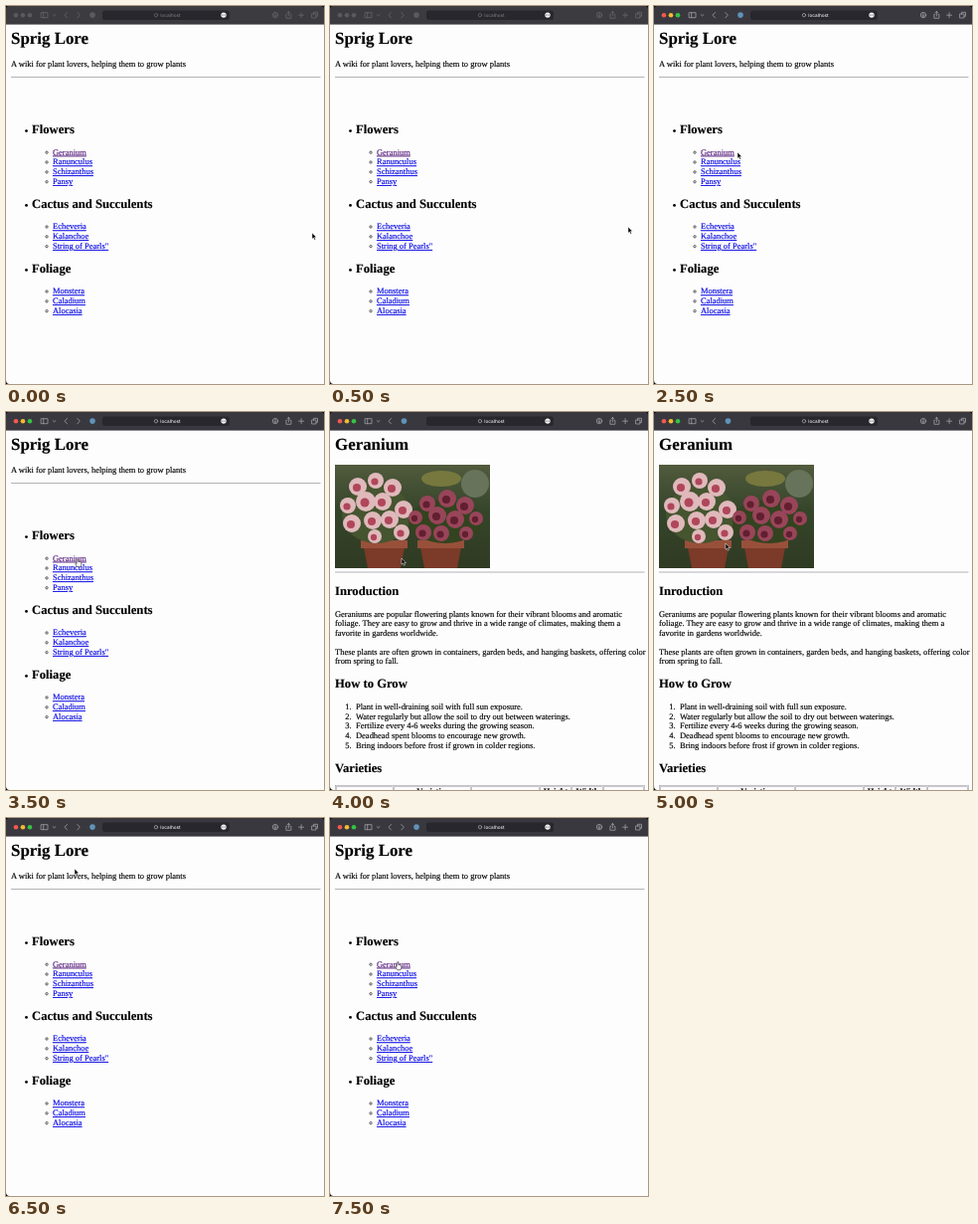
These frames come from a looping animation (320x380 px, 8000 ms). An HTML page:

```html
<!DOCTYPE html>
<html lang="en">
<head>
<meta charset="utf-8">
<title>Sprig Lore</title>
<style>
  html, body { margin: 0; width: 100%; height: 100%; overflow: hidden; background: #fdfdfd; }
  svg { display: block; width: 320px; height: 380px; }
  text {
    font: 8.47px "Liberation Serif", "Times New Roman", serif; white-space: pre; text-rendering: geometricPrecision;
    fill: currentColor; stroke: currentColor; stroke-width: .14;
  }
  .h1 { font-size: 16.9px; font-weight: bold; }
  .h2 { font-size: 12.65px; font-weight: bold; }
  .th { font-weight: bold; text-anchor: middle; }
  .link { color: #0000e4; text-decoration: underline; }
  .visited { color: #551a7b; text-decoration: underline; }
  .url { font: 500 4.7px Inter, "Liberation Sans", sans-serif; text-anchor: middle; color: #ececec; stroke: none; }
  .line { fill: none; stroke: #a09fa6; stroke-width: .8; stroke-linecap: round; stroke-linejoin: round; }
  .inactive .line { stroke: #66656c; }
  .inactive .url { color: #77767a; }
  .inactive .light, .inactive .badge { fill: #5b5a60; }
</style>
</head>
<body>
<svg viewBox="0 0 320 380">
  <rect width="320" height="380" fill="#fdfdfd"/>
  <g id="home"></g>
  <g id="plant"></g>
  <g id="bar">
    <rect id="barFill" width="320" height="18.6"/>
    <circle class="light" cx="10" cy="9.2" r="2.3" fill="#f25a50"/>
    <circle class="light" cx="17" cy="9.2" r="2.3" fill="#f2bb30"/>
    <circle class="light" cx="24" cy="9.2" r="2.3" fill="#35c445"/>
    <path class="line" d="M35.5 6.7h6.5v5h-6.5zM37.7 6.7v5M47.3 8.7l1.3 1.2 1.3-1.2"/>
    <path class="line" d="M61.5 6.5l-2.5 2.7 2.5 2.7"/>
    <path class="line" id="forward" d="M71.8 6.5l2.5 2.7-2.5 2.7"/>
    <circle class="badge" id="badge" cy="9.1" r="2.8" fill="#5f93b8"/>
    <rect x="97" y="4.4" width="128" height="9.6" rx="2.5" fill="#28272e"/>
    <circle class="line" cx="151" cy="9.2" r="1.7"/>
    <text class="url" x="165.5" y="10.9">localhost</text>
    <circle cx="219" cy="9.1" r="2.7" fill="#f4f4f4"/>
    <path d="M217.3 9.1h.8m.5 0h.8m.5 0h.8" stroke="#28272e" stroke-width=".8"/>
    <circle class="line" cx="271" cy="9.1" r="2.7"/>
    <path class="line" d="M271 7.5v3m-1.2-1.1l1.2 1.1 1.2-1.1M282.7 8.3h-.8v4h5v-4h-.8M284.4 10V5.5m-1.3 1.3l1.3-1.3 1.3 1.3M294.6 9.2h5M297.1 6.7v5M308 8h4v4h-4zM309.5 8V6.3h4v4h-1.5"/>
  </g>
  <path d="M0 0h3Q0 0 0 3zM320 0h-3q3 0 3 3zM0 380h3.5Q0 380 0 376z" fill="#000"/>
  <path id="arrow" d="M0 0v6.2l1.4-1.2 1 2.2 1.1-.5-1-2.1h1.9z" fill="#000" stroke="#fff" stroke-width=".5"/>
  <path id="hand" d="M-.8 3.5V.3Q0-.7.8.3v2.3q2.5 0 3 1v2.1L3 7.7H-.2L-2.3 4.6q.4-1 1.5 0z" fill="#fff" stroke="#222" stroke-width=".6"/>
</svg>
<script>
const el = id => document.getElementById(id);
const text = (x, y, s, kind = "") => `<text class="${kind}" x="${x}" y="${y}">${s}</text>`;
const lines = (x, y, rows, kind) => rows.map((s, i) => text(x, y + i * 9.8, s, kind)).join("");
const rule = y => `<rect x="5" y="${y}" width="311.5" height="1" fill="#b4b4b8"/>`;
const ball = (x, y, r, color) => `<circle cx="${x}" cy="${y}" r="${r}" fill="${color}"/>`;
const oval = (x, y, rx, ry, color) => `<ellipse cx="${x}" cy="${y}" rx="${rx}" ry="${ry}" fill="${color}"/>`;
const frame = (x, y, w) => `<rect x="${x}" y="${y}" width="${w}" height="14" fill="none" stroke="#8c8c94" stroke-width=".5"/>`;

function section(y, title, names) {
  const items = names.map((name, i) => {
    const row = y + 21.3 + i * 9.85;
    return `<circle cx="41" cy="${row - 2.3}" r="1.2" fill="none" stroke="#000" stroke-width=".6"/>` +
      text(47, row, name, name === "Geranium" ? "visited" : "link");
  });
  return ball(20.5, y - 2.6, 1.4, "#000") + text(26, y, title, "h2") + items.join("");
}

el("home").innerHTML =
  text(5, 38, "Sprig Lore", "h1") +
  text(5, 61, "A wiki for plant lovers, helping them to grow plants") +
  rule(71) +
  section(128.2, "Flowers", ["Geranium", "Ranunculus", "Schizanthus", "Pansy"]) +
  section(203, "Cactus and Succulents", ["Echeveria", "Kalanchoe", "String of Pearls\""]) +
  section(268, "Foliage", ["Monstera", "Caladium", "Alocasia"]);

// Soft flower clusters above two clay pots
const blooms = (spots, petal, heart) => spots.map(([x, y, r]) =>
  ball(x, y, r, petal) + ball(x - 1, y + 1, r * .45, heart)).join("");
const pot = (x, w) =>
  `<path d="M${x} 131h${w}l-5 26h${10 - w}z" fill="#7c3a28"/><rect x="${x - 2}" y="129" width="${w + 4}" height="8" fill="#98503a"/>`;
const photo =
  `<defs><linearGradient id="leafy" x2="0" y2="1"><stop stop-color="#515a3c"/><stop offset=".45" stop-color="#35452a"/><stop offset="1" stop-color="#2f3a22"/></linearGradient></defs>
  <rect x="5" y="53" width="156" height="104" fill="url(#leafy)"/>` +
  oval(112, 67, 20, 8, "#77783e") + oval(146, 72, 14, 14, "#67735a") +
  pot(33, 43) + pot(90, 43) +
  oval(47, 103, 35, 29, "#45552f") + oval(116, 110, 37, 22, "#33431f") +
  blooms([[46, 69, 8], [28, 75, 9], [63, 76, 9], [18, 94, 8], [36, 90, 10], [53, 90, 9], [74, 98, 9], [60, 108, 9], [22, 112, 9], [43, 109, 9], [45, 125, 7], [72, 121, 8]], "#dfb9bb", "#b0465a") +
  blooms([[118, 87, 9], [98, 92, 8], [136, 94, 9], [86, 106, 7], [108, 104, 9], [126, 108, 9], [147, 107, 7], [94, 121, 8], [112, 122, 8], [137, 122, 7]], "#98455a", "#621f2f");

const steps = [
  "Plant in well-draining soil with full sun exposure.",
  "Water regularly but allow the soil to dry out between waterings.",
  "Fertilize every 4-6 weeks during the growing season.",
  "Deadhead spent blooms to encourage new growth.",
  "Bring indoors before frost if grown in colder regions."
];
const columns = [6, 64, 142, 211, 243, 275, 316];
const heads = ["", "Varieties", "", "Height", "Width", ""];
const table = heads.map((s, i) => {
  const x = columns[i], w = columns[i + 1] - x;
  return frame(x + .5, 376.8, w - 1) + text(x + w / 2, 384.4, s, "th");
}).join("");

el("plant").innerHTML =
  text(5, 38, "Geranium", "h1") + photo + rule(160.5) +
  text(5, 184, "Inroduction", "h2") +
  lines(5, 205.5, [
    "Geraniums are popular flowering plants known for their vibrant blooms and aromatic",
    "foliage. They are easy to grow and thrive in a wide range of climates, making them a",
    "favorite in gardens worldwide."
  ]) +
  lines(5, 243.5, [
    "These plants are often grown in containers, garden beds, and hanging baskets, offering color",
    "from spring to fall."
  ]) +
  text(5, 277, "How to Grow", "h2") +
  lines(15.2, 298.8, steps.map((s, i) => `${i + 1}.`)) + lines(26, 298.8, steps) +
  text(5, 362, "Varieties", "h2") +
  frame(5.3, 375.5, 311.4) + table;

// Pointer stops, one per half second: x, y, over a link
const stops = [
  [308, 228], [300, 222], [190, 172], [111, 147], [100, 147], [84, 147], [73, 148, 1], [72, 148, 1],
  [72, 147], [72, 147], [72, 132], [63, 24], [59, 9], [69, 51], [69, 124], [68, 145, 1]
];
const show = (id, on) => el(id).style.display = on ? "" : "none";

function draw(now) {
  const t = now % 8000;
  const [x, y, link] = stops[Math.floor(t / 500)];
  const reading = t >= 4000 && t < 6500;
  const active = t >= 2000;
  show("home", !reading);
  show("plant", reading);
  show("forward", !reading);
  el("badge").setAttribute("cx", reading ? 74.5 : 87);
  el("bar").setAttribute("class", active ? "" : "inactive");
  el("barFill").setAttribute("fill", active ? "#39383f" : "#3c3b40");
  show("arrow", !link);
  show("hand", link);
  el(link ? "hand" : "arrow").setAttribute("transform", `translate(${x} ${y})`);
  requestAnimationFrame(draw);
}
requestAnimationFrame(draw);
</script>
</body>
</html>
```
